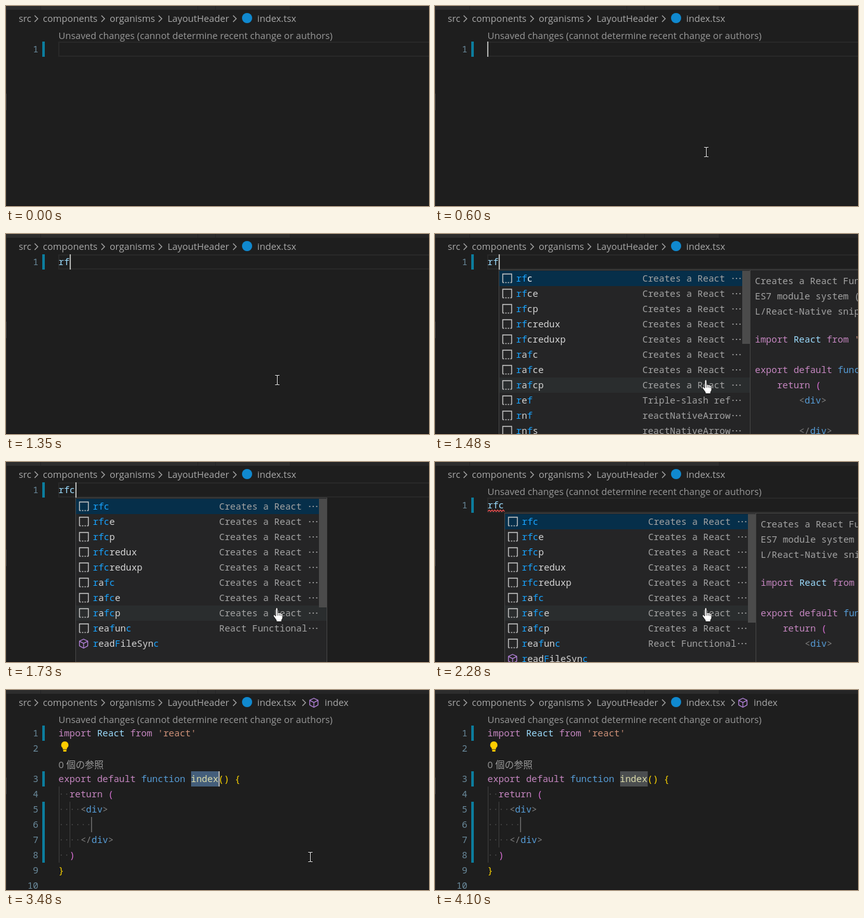
An HTML page for the animation above (4230 ms loop, 665x315 px).

```html
<!DOCTYPE html>
<html lang="en">
<head>
<meta charset="utf-8">
<title>Snippet completion</title>
<style>
html, body { margin: 0; width: 100%; height: 100%; overflow: hidden; background: #1e1e1e; }
svg { display: block; width: 665px; height: 315px; }
text { white-space: pre; }
.ui { font: 14.7px "Open Sans", "Noto Sans CJK JP", "Noto Sans CJK", sans-serif; }
.code { font: 14.45px "Noto Sans Mono", "DejaVu Sans Mono", monospace; font-variant-ligatures: none; }
</style>
</head>
<body>
<svg id="stage" viewBox="0 0 665 315"></svg>
<script>
const LOOP = 4230;
const X0 = 82.5, CH = 8.667, ROW = 24;
const C = {
  bg: '#1e1e1e', key: '#c586c0', name: '#9cdcfe', str: '#ce9178', blue: '#569cd6', fn: '#dcdcaa',
  gold: '#ffd700', pink: '#da70d6', tag: '#808080', num: '#6a8a9c', ui: '#a9a9a9', lens: '#999999',
  panel: '#252526', edge: '#454545', match: '#18a3ff', dim: '#a3a3a3', bar: '#0c7d9d'
};
const stage = document.getElementById('stage');

const esc = s => s.replace(/&/g, '&amp;').replace(/</g, '&lt;');
const rect = (x, y, w, h, fill, more = '') =>
  `<rect x="${x}" y="${y}" width="${w}" height="${h}" fill="${fill}" ${more}/>`;
const line = (d, color, w = 1, more = '') =>
  `<path d="${d}" fill="none" stroke="${color}" stroke-width="${w}" ${more}/>`;
const text = (cls, x, y, s, fill, more = '') =>
  `<text class="${cls}" x="${x}" y="${y}" fill="${fill}" ${more}>${esc(s)}</text>`;
const ui = (x, y, s, fill) => text('ui', x, y, s, fill);
// Monospace text, centred vertically on cy
const code = (x, cy, s, fill, more) => text('code', x, cy + 5, s, fill, more);

// Tokens are [text, colour] pairs; blanks only advance the column
function tokens(x, cy, list) {
  let col = 0, out = '';
  for (const [s, fill] of list) {
    if (fill) out += code(x + col * CH, cy, s, fill);
    col += s.length;
  }
  return out;
}

const IMPORT = [['import', C.key], [' '], ['React', C.name], [' '], ['from', C.key], [' '], ["'react'", C.str]];
const EXPORT = [['export', C.key], [' '], ['default', C.key], [' '], ['function', C.blue], [' '],
  ['index', C.fn], ['()', C.gold], [' '], ['{', C.gold]];
const RETURN = [['return', C.key], [' '], ['(', C.pink]];
const OPEN = [['<', C.tag], ['div', C.blue], ['>', C.tag]];
const CLOSE = [['</', C.tag], ['div', C.blue], ['>', C.tag]];
const indent = (n, list) => [[' '.repeat(n)], ...list];

const FILE = [IMPORT, [], EXPORT, indent(2, RETURN), indent(4, OPEN), [], indent(4, CLOSE),
  indent(2, [[')', C.pink]]), [['}', C.gold]], []];

function cube(cx, cy) {
  return line(`M${cx} ${cy - 7}l6.5 3.2v7.4l-6.5 3.6l-6.5-3.6v-7.4zM${cx - 6.5} ${cy - 3.6}l6.5 3.2l6.5-3.2M${cx} ${cy - .4}v7.4`,
    '#b180d7', 1.3, 'stroke-linejoin="round"');
}

const chevron = x => line(`M${x - 3} 15l5 5l-5 5`, C.ui, 1.3);

function chrome(withSymbol) {
  let s = rect(0, 0, 665, 315, C.bg) + rect(0, 0, 665, 6, C.panel) + rect(0, 0, 446, 6, '#2d2d2d');
  for (const x of [54, 301, 329]) s += rect(x, 0, 1, 6, C.panel);
  s += rect(0, 6, 1, 309, '#2a2a2a') + rect(0, 138, 1, 26, '#454545') + rect(0, 314, 665, 1, '#181416');
  const crumbs = [[20, 'src'], [58, 'components'], [163, 'organisms'], [254, 'LayoutHeader'], [395, 'index.tsx']];
  for (const [x, label] of crumbs) s += ui(x, 25, label, C.ui);
  for (const x of [48, 153, 243, 360]) s += chevron(x);
  s += `<circle cx="379" cy="19" r="8" fill="#1089cf"/>`;
  if (withSymbol) s += chevron(469) + cube(484, 20) + ui(501, 25, 'index', C.ui);
  return s;
}

const unsaved = () => ui(82.5, 52, 'Unsaved changes (cannot determine recent change or authors)', C.lens);
const lineNo = (n, cy) => code(51, cy, String(n), C.num, 'text-anchor="end"');
const gutter = (cy, rows = 1) => rect(57, cy - 12, 4, ROW * rows, C.bar);
const caret = (x, cy) => rect(x, cy - 12, 2, ROW, '#aeafad');

function squiggle() {
  let d = 'M83 78';
  for (let i = 0; i < 6; i++) d += 'l2.2-2.4l2.2 2.4';
  return line(d, '#f14c4c', 1.2);
}

// Colours the letters of query in order, as a fuzzy match
function matched(x, cy, word, query, plain) {
  let q = 0, out = '';
  [...word].forEach((ch, i) => {
    const hit = q < query.length && ch.toLowerCase() === query[q];
    if (hit) q++;
    out += code(x + i * CH, cy, ch, hit ? C.match : plain, hit ? 'font-weight="700"' : '');
  });
  return out;
}

const CREATES = 'Creates a React';
const BASIC = ['rfc', 'rfce', 'rfcp', 'rfcredux', 'rfcreduxp', 'rafc', 'rafce', 'rafcp'].map(w => [w, CREATES]);
const LISTS = {
  rf: [...BASIC, ['ref', 'Triple-slash ref'], ['rnf', 'reactNativeArrow'], ['rnfs', 'reactNativeArrow']],
  rfc: [...BASIC, ['reafunc', 'React Functional'], ['readFileSync', '']]
};

function snippetIcon(x, cy) {
  return line(`M${x} ${cy + 6.5}v-13.5h14v13.5`, '#c5c5c5', 1.4) +
    line(`M${x} ${cy + 6.5}h14`, '#c5c5c5', 1.5, 'stroke-dasharray="2 2"');
}

function popup(query, top, withDocs) {
  const px = Math.round(X0 + CH * query.length);
  const hover = Math.floor((231 - top - 2) / ROW);
  let s = rect(px + .5, top + .5, 395, 300, C.panel, `stroke="${C.edge}"`);
  LISTS[query].forEach(([word, detail], i) => {
    const cy = top + 14 + i * ROW;
    if (i === 0) s += rect(px + 1, cy - 12, 394, ROW, '#062f4a');
    if (i === hover) s += rect(px + 1, cy - 12, 394, ROW, '#2a2d2e');
    s += detail ? snippetIcon(px + 6.5, cy) : cube(px + 13, cy);
    s += matched(px + 27.5, cy, word, query, i ? '#d4d4d4' : '#ffffff');
    if (!detail) return;
    s += code(px + 226, cy, detail, C.dim);
    for (const dx of [368.5, 374, 379.5]) s += `<circle cx="${px + dx}" cy="${cy}" r="1.1" fill="${C.dim}"/>`;
  });
  s += rect(px + 383, top + 2, 12, query === 'rf' ? 115 : 171, '#4b4b4b');
  return withDocs ? s + docs(px + 395, top) : s;
}

function docs(x, top) {
  const tx = x + 8;
  let s = rect(x + .5, top + .5, 300, 300, C.panel, `stroke="${C.edge}"`);
  ['Creates a React Functional', 'ES7 module system (TypeScript', 'L/React-Native snippets']
    .forEach((t, i) => { s += code(tx, top + 18 + i * ROW, t, C.dim); });
  const rows = [[110, IMPORT], [158, EXPORT], [182, indent(4, RETURN)], [206, indent(8, OPEN)], [254, indent(8, CLOSE)]];
  for (const [dy, list] of rows) s += tokens(tx, top + dy, list);
  return s;
}

function typing(t) {
  const word = t < 1230 ? '' : t < 1350 ? 'r' : t < 1730 ? 'rf' : 'rfc';
  const lens = t < 1230 || t >= 1870;
  const cy = lens ? 68 : 44;
  const caretOn = (t >= 530 && t < 1030) || (t >= 1230 && t < 2230);
  let s = lens ? unsaved() : '';
  s += rect(83, cy - 11, 600, 22, 'none', 'stroke="#282828" stroke-width="2"');
  s += lineNo(1, cy) + gutter(cy) + code(X0, cy, word, C.name);
  if (t >= 2280) s += squiggle();
  if (caretOn) s += caret(Math.round(X0 + word.length * CH) - (word ? 0 : 1), cy);
  if (t >= 1420) s += popup(word, cy + 12, t < 1730 ? t >= 1480 : t >= 1800);
  return s;
}

function bulb() {
  return '<path d="M92.5 81a5.8 5.8 0 0 0-3.3 10.5v2h6.6v-2A5.8 5.8 0 0 0 92.5 81z" fill="#ffcc00"/>' +
    rect(89.8, 94.3, 5.4, 2.7, '#ffcc00', 'rx="1"');
}

function inserted(t) {
  const gap = t >= 2530 ? ROW : 0;
  const yOf = n => 68 + (n - 1) * ROW + (n > 2 ? gap - ROW : 0) + (n > 2 ? ROW - ROW * 1 : 0);
  const rowY = n => n > 2 ? yOf(n) + ROW : yOf(n);
  const y3 = rowY(3);
  const caretOn = t < 2850 || (t >= 3350 && t < 3850);
  let s = unsaved();
  s += rect(291, y3 - 12, 43.5, ROW, t < 4100 ? '#445e7b' : '#4b4e50');
  s += line(`M83.5 ${y3 + 12}v120M100.5 ${y3 + 36}v72`, '#404040');
  s += line(`M134.5 ${y3 + 60}v24`, '#777777', 1.3);
  [2, 4, 6, 4, 2].forEach((n, i) => {
    for (let k = 0; k < n; k++)
      s += `<circle cx="${X0 + (k + .5) * CH}" cy="${rowY(4 + i)}" r="0.9" fill="#4a4a4a"/>`;
  });
  s += gutter(68) + gutter(y3) + gutter(rowY(5), 4);
  FILE.forEach((list, i) => { s += lineNo(i + 1, rowY(i + 1)) + tokens(X0, rowY(i + 1), list); });
  if (t < 2920) s += squiggle();
  if (t >= 2600) s += bulb();
  if (t >= 2790) s += ui(82.5, 123, '0 個の参照', C.lens);
  if (caretOn) s += caret(334, y3);
  return s;
}

function pointerAt(t) {
  if (t < 240) return null;
  if (t < 3350) {
    const u = Math.min(1, Math.floor((t - 240) / 60) / 6);
    const rest = (1 - u) ** 2;
    return [426 + 107 * rest, 230 + 72 * rest];
  }
  const u = Math.floor((t - 3350) / 62.5) / 7;
  if (u > 1) return null;
  const curve = (a, b, c) => (1 - u) ** 2 * a + 2 * u * (1 - u) * b + u * u * c;
  return [curve(426, 512, 637), curve(230, 294, 314)];
}

function pointer(t) {
  const at = pointerAt(t);
  if (!at) return '';
  const [x, y] = at.map(Math.round);
  const beam = 'M-3.5-7.5h2.5l1 1l1-1h2.5M0-6.5v13M-3.5 7.5h2.5l1-1l1 1h2.5';
  const hand = 'M-2.5 0.5q1.7-1.8 3.2 0v7q1.5-1 2.8 .4q1.6-.8 2.6 .6q1.8-.6 2.4 1.2v6.3l-1.7 3.2v2.3h-8.3v-2.2l-4.6-6.5q-.7-2.4 1.4-2.3l2.2 2z';
  const shape = t >= 1420 && t < 2350
    ? `<path d="${hand}" fill="#fff" stroke="#111" stroke-width="1"/>` + line('M.7 8v4M3.5 9v3M6 9.5v3', '#222', .8)
    : line(beam, '#000', 2.4) + line(beam, '#e4e4e4', 1.1);
  return `<g transform="translate(${x + .5} ${y})">${shape}</g>`;
}

let shown = '';
function draw(t) {
  const s = chrome(t >= 2720) + (t < 2350 ? typing(t) : inserted(t)) + pointer(t);
  if (s !== shown) stage.innerHTML = shown = s;
}

const start = performance.now();
function tick() {
  draw((performance.now() - start) % LOOP);
  requestAnimationFrame(tick);
}
tick();
</script>
</body>
</html>
```
